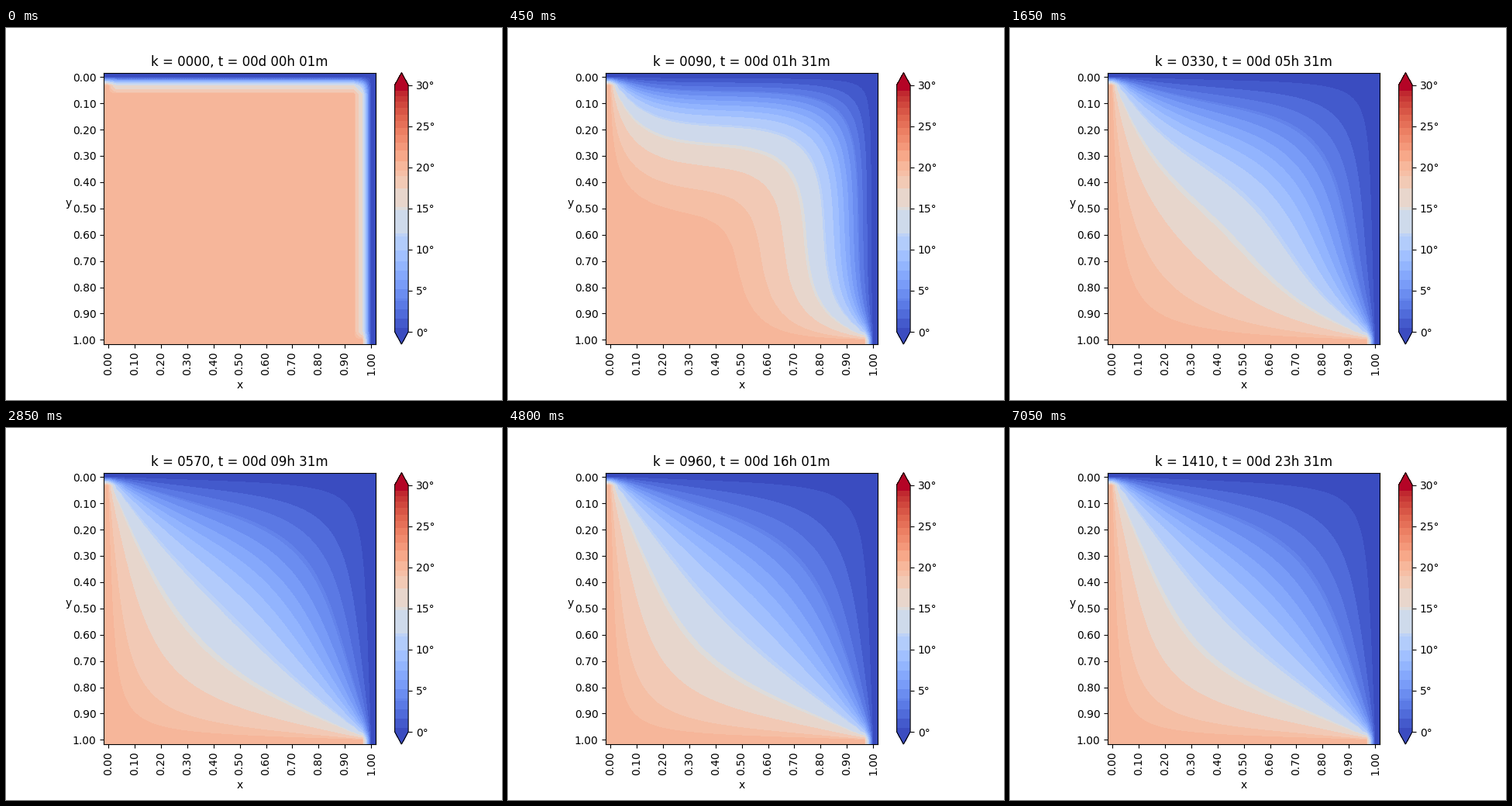
A matplotlib script for the animation above (7200 ms loop, 640 by 480 pixels).

```python
import numpy as np
import matplotlib.pyplot as plt
from matplotlib.animation import FuncAnimation
from matplotlib.colors import ListedColormap

CELLS = 31
FRAMES, INTERVAL = 48, 150
STEPS_PER_FRAME = 30
T_WARM, T_MAX = 20.0, 30.0
R = 0.25  # alpha * dt / dx^2

# Temperatures at which the displayed colour changes.
EDGES = [0, 0.5, 1.6, 2.7, 3.8, 4.1, 5.2, 6.3, 7.4, 8.6, 9.9, 11.6, 12,
         14.8, 15.2, 17.4, 18.9, 19.6, 20.7, 22, 23, 23.9, 24.8, 25.6,
         26.4, 27.2, 28, 28.6, 29.3, 30]


def banded_cmap(edges, n=1024):
    edges = np.array(edges) / T_MAX
    mids = (edges[:-1] + edges[1:]) / 2
    mids[0], mids[-1] = 0, 1
    band = np.searchsorted(edges, (np.arange(n) + 0.5) / n) - 1
    return ListedColormap(plt.get_cmap("coolwarm")(mids[band]))


def simulate():
    """Explicit heat equation: cold top and right, warm left and bottom."""
    u = np.full((CELLS, CELLS), T_WARM)
    u[0, :] = 0
    u[:, -1] = 0
    states = []
    for k in range(STEPS_PER_FRAME * (FRAMES - 1) + 1):
        c = u[1:-1, 1:-1]
        near = u[:-2, 1:-1] + u[2:, 1:-1] + u[1:-1, :-2] + u[1:-1, 2:]
        u[1:-1, 1:-1] = c + R * (near - 4 * c)
        if k % STEPS_PER_FRAME == 0:
            states.append(u.copy())
    return states


def title_text(k):
    hours, minutes = divmod(k + 1, 60)
    days, hours = divmod(hours, 24)
    return f"k = {k:04d}, t = {days:02d}d {hours:02d}h {minutes:02d}m"


states = simulate()

plt.rcParams["font.family"] = "DejaVu Sans"
fig, ax = plt.subplots(figsize=(6.4, 4.8), dpi=100)
fig.subplots_adjust(left=0.125, right=0.9, bottom=0.15, top=0.88)

img = ax.imshow(states[0], cmap=banded_cmap(EDGES), vmin=0, vmax=T_MAX,
                interpolation="bilinear")
bar = fig.colorbar(img, ax=ax, extend="both", ticks=np.arange(0, 31, 5))
bar.ax.set_yticklabels([f"{t}°" for t in range(0, 31, 5)])

ticks = np.arange(0, CELLS, 3)
labels = [f"{t / (CELLS - 1):.2f}" for t in ticks]
ax.set_xticks(ticks, labels, rotation="vertical")
ax.set_yticks(ticks, labels)
ax.set_xlabel("x")
ax.set_ylabel("y", rotation=0)
title = ax.set_title(title_text(0))


def update(i):
    img.set_data(states[i])
    title.set_text(title_text(i * STEPS_PER_FRAME))
    return img, title


anim = FuncAnimation(fig, update, frames=FRAMES, interval=INTERVAL,
                     repeat=True, repeat_delay=0, blit=False)
plt.show()
```
